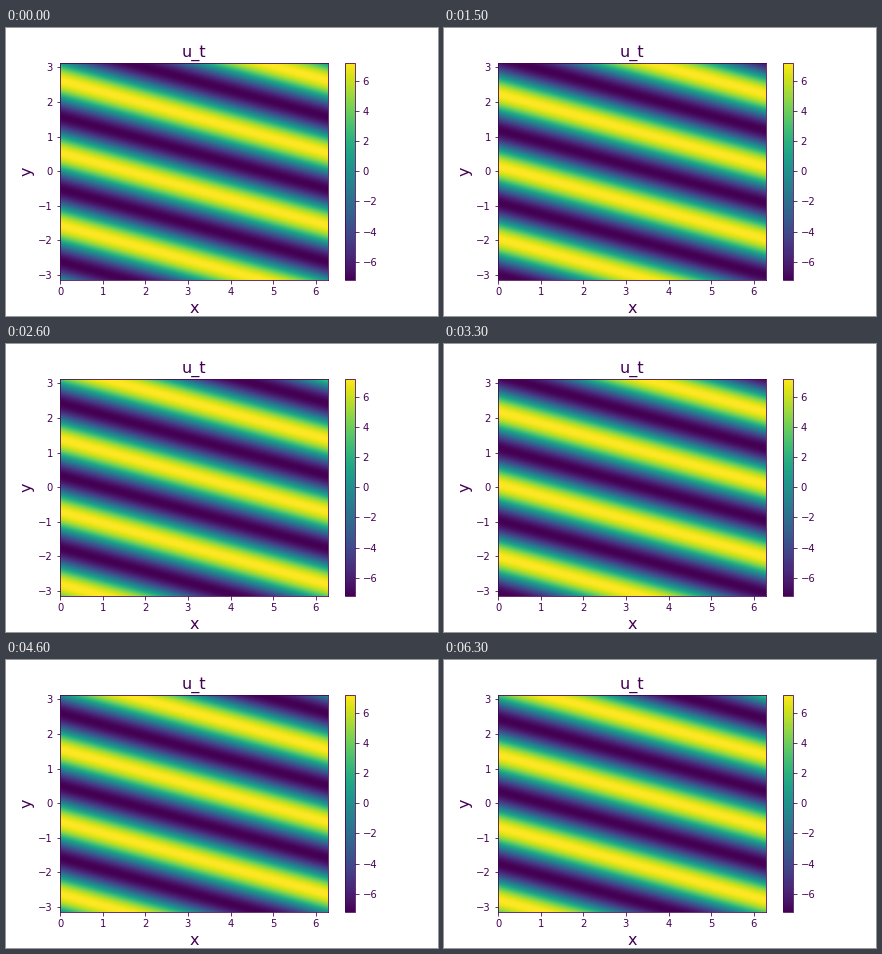
These frames come from a looping animation (432x288 px, 6400 ms). A matplotlib script:

```python
import numpy as np
import matplotlib.pyplot as plt
from matplotlib.animation import FuncAnimation

FRAMES = 64
INTERVAL = 100
AMPLITUDE = 52 ** 0.5
PHASE_STEP = 0.3403
INK = "#440154"

plt.rcParams.update({
    "font.family": "DejaVu Sans",
    "font.size": 10,
    "figure.subplot.bottom": 0.125,
    "figure.subplot.top": 0.88,
    "text.color": INK,
    "axes.labelcolor": INK,
    "axes.edgecolor": INK,
    "xtick.color": INK,
    "ytick.color": INK,
})

x = np.linspace(0, 2 * np.pi, 300)
y = np.linspace(-np.pi, np.pi, 300)
X, Y = np.meshgrid(x, y)


def wave(frame):
    """Plane wave travelling towards +x and +y."""
    return AMPLITUDE * np.sin(X + 3 * Y - PHASE_STEP * frame)


fig, ax = plt.subplots(figsize=(6, 4), dpi=72)
image = ax.imshow(
    wave(0), origin="lower", aspect="auto", cmap="viridis",
    extent=(0, 2 * np.pi, -np.pi, np.pi),
    vmin=-AMPLITUDE, vmax=AMPLITUDE, interpolation="bilinear",
)
fig.colorbar(image, ax=ax)
ax.set_title("u_t", fontsize=16)
ax.set_xlabel("x", fontsize=16)
ax.set_ylabel("y", fontsize=16)


def update(frame):
    image.set_data(wave(frame))
    return [image]


anim = FuncAnimation(fig, update, frames=FRAMES, interval=INTERVAL,
                     repeat=True, repeat_delay=0)
plt.show()
```
